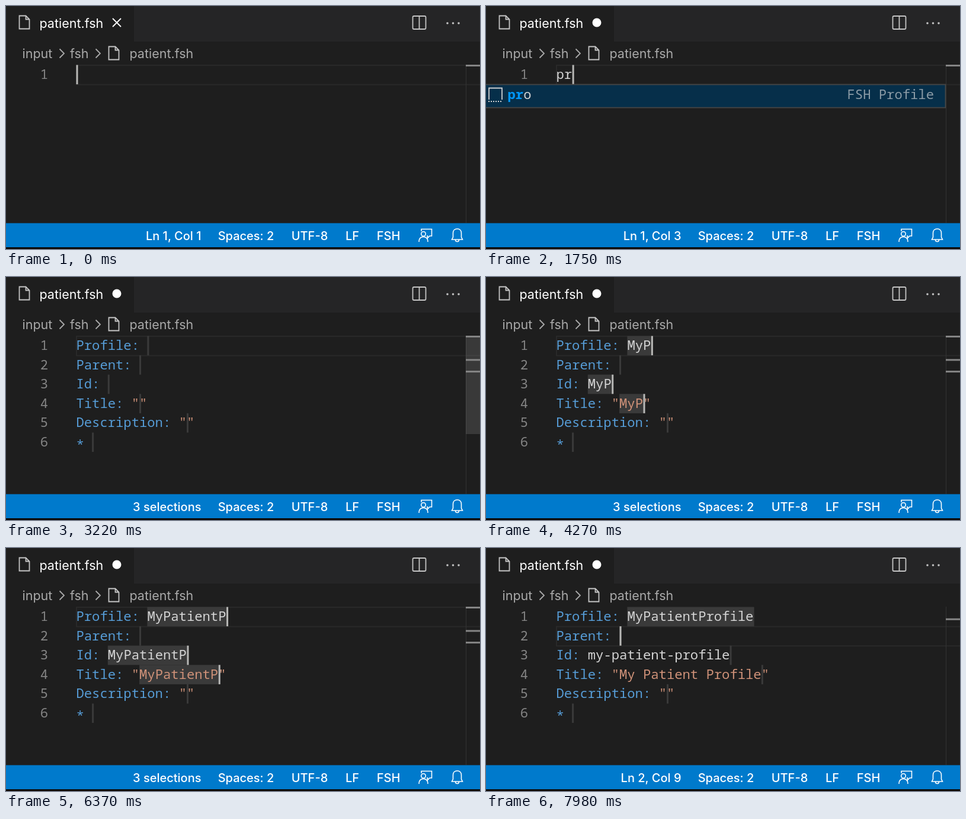
Animation, 800 px wide and 410 px high, one loop 8000 ms. Source, as an HTML page:

```html
<!DOCTYPE html>
<html lang="en">
<head>
<meta charset="utf-8">
<title>Snippet completion</title>
<style>
  html, body { margin: 0; width: 100%; height: 100%; overflow: hidden; background: #1e1e1e; }
  svg { display: block; width: 800px; height: 410px; }
  text { white-space: pre; }
  .ui { font: 21.5px Inter, "Liberation Sans", sans-serif; }
  .status { font: 500 20px Inter, "Liberation Sans", sans-serif; fill: #fff; text-anchor: middle; }
  .code { font: 500 22.2px "Noto Sans Mono", "DejaVu Sans Mono", monospace; }
  .bold { font-weight: 700; }
  .end { text-anchor: end; }
  .line { fill: none; stroke-width: 1.8; }
</style>
</head>
<body>
<svg viewBox="0 0 800 410">
  <defs>
    <path id="file" class="line" d="M1 1H12L18 7V23H1ZM12 1V7H18"/>
    <path id="chevron" class="line" d="M0 0L7.5 7.5L0 15"/>
  </defs>

  <rect width="800" height="410" fill="#1e1e1e"/>
  <rect x="216" width="584" height="60" fill="#252526"/>
  <use href="#file" x="21.5" y="15.5" stroke="#c5c5c5"/>
  <text class="ui" x="56.5" y="36.5" fill="#fff">patient.fsh</text>
  <path id="close" class="line" stroke="#fff" d="M180 21L194 35M194 21L180 35"/>
  <circle id="dirty" cx="187" cy="28" r="7.5" fill="#fff"/>
  <g class="line" stroke="#c5c5c5">
    <rect x="686.5" y="17" width="22" height="22" rx="2"/>
    <path d="M697.5 17V39"/>
  </g>
  <g fill="#c5c5c5">
    <circle cx="745" cy="29" r="1.8"/><circle cx="754.5" cy="29" r="1.8"/><circle cx="764" cy="29" r="1.8"/>
  </g>

  <g class="ui" fill="#a9a9a9">
    <text x="27.5" y="87.5">input</text>
    <text x="108" y="87.5">fsh</text>
    <text x="208.5" y="87.5">patient.fsh</text>
  </g>
  <g stroke="#a9a9a9">
    <use href="#chevron" x="90.5" y="72.5"/>
    <use href="#chevron" x="151.5" y="72.5"/>
  </g>
  <use href="#file" x="172.5" y="67.5" stroke="#c5c5c5"/>

  <g id="editor"></g>
  <path d="M776.5 99V366" stroke="#333"/>
  <rect id="slider" x="776" y="100" width="24" height="165" fill="#797979"/>
  <g id="ruler"></g>
  <g id="popup"></g>

  <rect y="366.4" width="800" height="40.6" fill="#007acc"/>
  <rect y="407" width="800" height="3" fill="#0b0b0b"/>
  <g class="status">
    <text id="position" class="end" x="329.5" y="394.5"></text>
    <text x="405" y="394.5">Spaces: 2</text>
    <text x="512.5" y="394.5">UTF-8</text>
    <text x="584.5" y="394.5">LF</text>
    <text x="645.5" y="394.5">FSH</text>
  </g>
  <g class="line" stroke="#fff" style="stroke-width:1.6">
    <path d="M701 380V376.5H718.5V388H715L711.5 391.5V388H710"/>
    <circle cx="704.5" cy="384.5" r="3.8"/>
    <path d="M697 398C697 392 700 389.5 704.5 389.5S712 392 712 398"/>
    <path d="M752.5 394H770.5L768.5 390V383C768.5 378.5 765.5 376 761.5 376S754.5 378.5 754.5 383V390ZM758.5 394.5C758.5 398.5 764.5 398.5 764.5 394.5"/>
  </g>
</svg>

<script>
const LOOP = 8000, LEFT = 118.5, TOP = 99.5, CHAR = 13.32, ROW = 32.6;
const POPUP_OPEN = 1330, EXPAND = 2520, NEXT_FIELD = 7560;
const PREFIX = "pro", NAME = "MyPatientProfile";
const prefixTimes = [1190, 1750, 2100];
const nameTimes = [3640, 3920, 4200, 4550, 4760, 4970, 5250, 5460, 5670,
                   6300, 6440, 6580, 6720, 6860, 7070, 7280];
const edits = [...prefixTimes, EXPAND, ...nameTimes, NEXT_FIELD];

const el = id => document.getElementById(id);
const colX = col => LEFT + col * CHAR;
const rowY = row => TOP + row * ROW;
const countBefore = (times, t) => times.filter(time => time <= t).length;
const rect = (x, y, w, h, fill) =>
  `<rect x="${x}" y="${y}" width="${w}" height="${h}" fill="${fill}"/>`;
const codeText = (x, y, fill, text, style = "") =>
  `<text class="code ${style}" x="${x}" y="${y}" fill="${fill}">${text}</text>`;

// Each row: keyword, value, whether the value is quoted.
function snippetRows(typed, done) {
  const words = NAME.split(/(?=[A-Z])/);
  return [
    ["Profile: ", typed],
    ["Parent: ", ""],
    ["Id: ", done ? words.join("-").toLowerCase() : typed],
    ["Title: ", done ? words.join(" ") : typed, true],
    ["Description: ", "", true],
    ["* ", ""]
  ];
}

function drawRow([keyword, value, quoted], row, done) {
  const start = keyword.length + (quoted ? 1 : 0);
  const end = start + value.length;
  const base = rowY(row) + 23.5;
  const collapsed = done && (row === 2 || row === 3);
  const markCol = collapsed ? end : start;
  const width = collapsed ? 3 : Math.max(3, value.length * CHAR + 1);
  const shown = quoted ? `"${value}"` : value;
  // The asterisk is centred on the line rather than raised.
  const label = keyword.replace("*", '<tspan dy="5">*</tspan>');
  return {
    end,
    svg: rect(colX(markCol), rowY(row), width, ROW, "#3a3a3a") +
      codeText(LEFT, base, "#569cd6", label) +
      codeText(colX(keyword.length), base, quoted ? "#ce9178" : "#d4d4d4", shown)
  };
}

function drawEditor(t, expanded, done, prefix, typed) {
  const active = done ? 1 : 0;
  let svg = `<rect x="119" y="${rowY(active) + .5}" width="682" height="${ROW}"
    fill="none" stroke="#292929" stroke-width="2"/>`;
  let carets = [[0, prefix.length]];
  let rowCount = 1;
  if (expanded) {
    const rows = snippetRows(typed, done).map((row, i) => drawRow(row, i, done));
    svg += rows.map(row => row.svg).join("");
    carets = (done ? [1] : [0, 2, 3]).map(row => [row, rows[row].end]);
    rowCount = rows.length;
  } else {
    svg += codeText(LEFT, rowY(0) + 23.5, "#d4d4d4", prefix);
  }
  for (let i = 0; i < rowCount; i++)
    svg += codeText(71, rowY(i) + 23.5, "#858585", i + 1, "end");

  const lastEdit = edits.filter(time => time <= t).pop() || 0;
  if ((t - lastEdit) % 980 < 490)
    svg += carets.map(([row, col]) =>
      rect(colX(col) + (col ? .5 : 0), rowY(row), 3, ROW, "#b8b8b6")).join("");
  el("editor").innerHTML = svg;
  el("ruler").innerHTML = carets.map(([row]) =>
    rect(776, 99 + row * 19.7, 24, 3, "#858585")).join("");
}

function drawPopup(matched) {
  const rest = PREFIX.slice(matched.length);
  el("popup").innerHTML =
    `<rect x="-2" y="132.5" width="777.5" height="39" fill="#062f4a" stroke="#454545" stroke-width="1.8"/>
     <path class="line" stroke="#d0d0d0" d="M5 158V138.5H27V158"/>
     <path class="line" stroke="#d0d0d0" stroke-dasharray="2 2" d="M4 161H28"/>` +
    codeText(36.5, 157, "#0097fb", matched, "bold") +
    codeText(36.5 + matched.length * CHAR, 157, "#d4d4d4", rest) +
    codeText(756, 157, "#8b9ba6", "FSH Profile", "end");
}

function draw(t) {
  const expanded = t >= EXPAND, done = t >= NEXT_FIELD;
  const prefix = PREFIX.slice(0, countBefore(prefixTimes, t));
  const typed = NAME.slice(0, countBefore(nameTimes, t));
  drawEditor(t, expanded, done, prefix, typed);

  const popupOpen = t >= POPUP_OPEN && !expanded;
  el("popup").style.display = popupOpen ? "" : "none";
  if (popupOpen) drawPopup(prefix);

  el("close").style.display = prefix ? "none" : "";
  el("dirty").style.display = prefix ? "" : "none";

  const age = t - EXPAND;
  const fade = Math.min(age / 100, 1 - (age - 500) / 800, 1);
  el("slider").setAttribute("opacity", .4 * Math.max(0, fade));

  el("position").textContent = done ? "Ln 2, Col 9"
    : expanded ? "3 selections" : `Ln 1, Col ${prefix.length + 1}`;
}

function frame() {
  draw(performance.now() % LOOP);
  requestAnimationFrame(frame);
}
frame();
</script>
</body>
</html>
```
